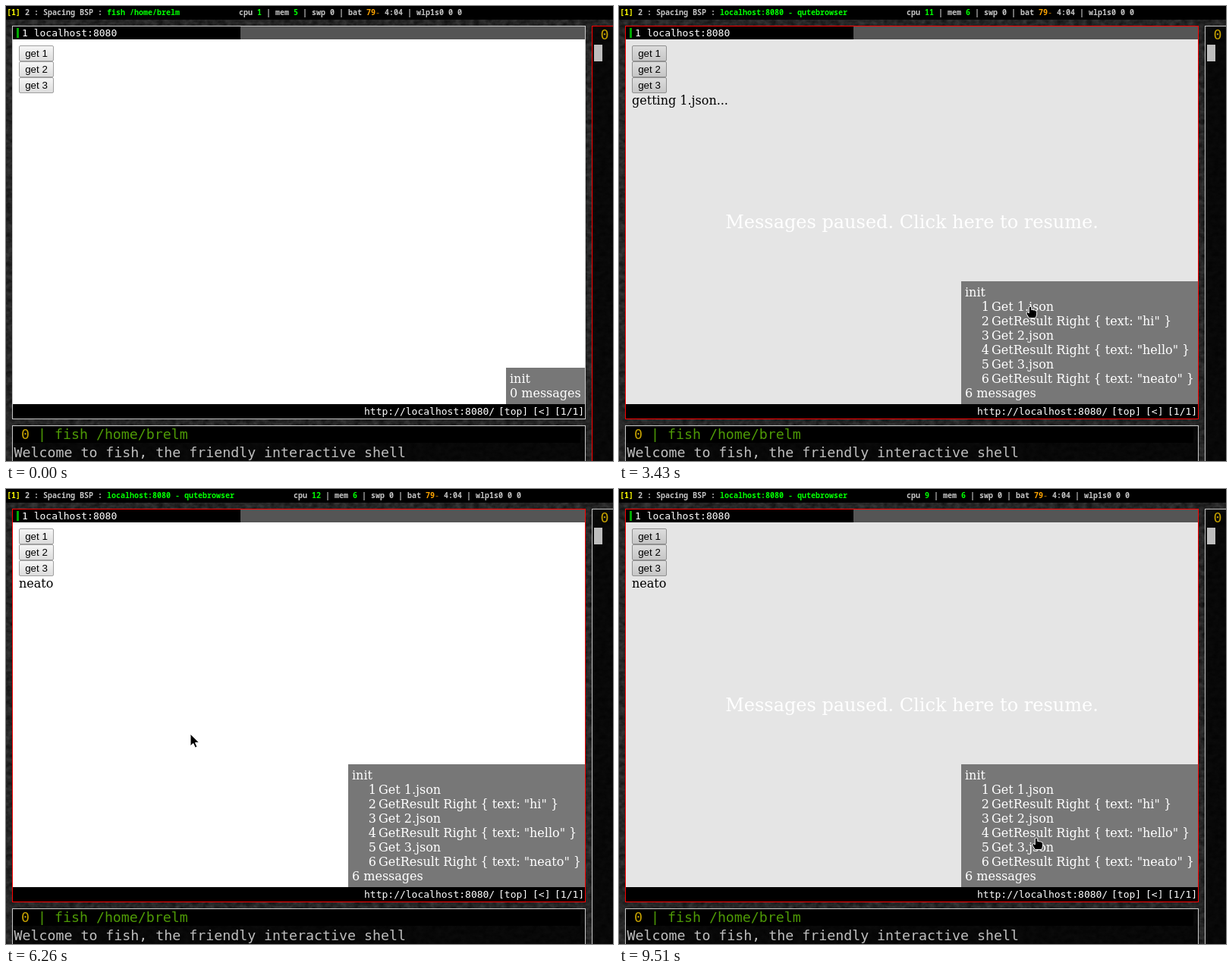
These frames come from a looping animation (800x600 px, 9560 ms). An HTML page:

```html
<!DOCTYPE html>
<html lang="en">
<head>
<meta charset="utf-8">
<title>Message log demo</title>
<style>
html, body { margin: 0; width: 100%; height: 100%; overflow: hidden; background: #000; }
svg { display: block; }
text { white-space: pre; }
.bar { font: bold 10px "Noto Sans Mono", monospace; fill: #c4c4c4; }
.mono { font: 13px "DejaVu Sans Mono", monospace; fill: #fff; }
.term { font: 18.25px "DejaVu Sans Mono", monospace; fill: #bebebe; }
.serif { font: 16px "DejaVu Serif", serif; }
.button { font: 13.333px "Liberation Sans", sans-serif; text-anchor: middle; }
.paused { font: 24px "DejaVu Serif", serif; fill: #fff; text-anchor: middle; }
.good { fill: #0f0; }
.warn { fill: #ffa500; }
.dim { fill: #8a5a00; }
.gold { fill: #c4a000; }
.leaf { fill: #4e9a06; }
</style>
</head>
<body>
<svg id="stage" width="800" height="600" viewBox="0 0 800 600">
  <defs>
    <filter id="grain" x="0" y="0" width="100%" height="100%" color-interpolation-filters="sRGB">
      <feTurbulence type="fractalNoise" baseFrequency=".12 .16" numOctaves="3" seed="4"/>
      <feColorMatrix values=".2 0 0 0 .05  .2 0 0 0 .05  .2 0 0 0 .05  0 0 0 0 1"/>
    </filter>
    <linearGradient id="face" x2="0" y2="1">
      <stop offset="0" stop-color="#f6f6f6"/>
      <stop offset="1" stop-color="#dcdcdc"/>
    </linearGradient>
  </defs>

  <rect width="800" height="600" filter="url(#grain)"/>
  <rect width="800" height="18"/>
  <text id="bar" class="bar" x="1" y="12"></text>

  <rect id="sideWindow" x="772.5" y="26.5" width="60" height="600" fill="#000" fill-opacity=".8"/>
  <text class="term gold" x="783.5" y="44">0</text>
  <rect x="775" y="51" width="11" height="22" fill="#bebebe"/>

  <rect x="8.5" y="553.5" width="755" height="60" fill="#000" fill-opacity=".8" stroke="#c8c8c8"/>
  <rect x="10" y="555" width="747" height="21"/>
  <text class="term gold" x="20" y="571">0 <tspan class="leaf">| fish /home/brelm</tspan></text>
  <text class="term" x="10.5" y="595">Welcome to fish, the friendly interactive shell</text>

  <rect x="9" y="27" width="300" height="17"/>
  <rect x="309" y="27" width="454" height="17" fill="#555"/>
  <rect x="14" y="29" width="3" height="13" fill="#0a0"/>
  <text class="mono" x="21" y="40">1 localhost:8080</text>
  <rect x="9" y="44" width="754" height="481" fill="#fff"/>
  <g id="buttons"></g>
  <text id="output" class="serif" x="17" y="130"></text>
  <g id="overlay">
    <rect x="9" y="44" width="754" height="481" fill-opacity=".1"/>
    <text class="paused" x="386" y="293">Messages paused. Click here to resume.</text>
  </g>
  <g id="panel" class="serif" fill="#fff"></g>
  <rect x="9" y="525" width="754" height="19"/>
  <text class="mono" x="472" y="539">http://localhost:8080/</text>
  <text class="mono" x="649" y="539">[top]</text>
  <text class="mono" x="694" y="539">[&lt;]</text>
  <text class="mono" x="723" y="539">[1/1]</text>
  <rect id="browser" x="8.5" y="26.5" width="755" height="518" fill="none"/>

  <g id="pointer" stroke="#fff" stroke-linejoin="round">
    <path id="arrow" d="M0 0V16L3.8 12.6 6.4 18.2 9 17 6.5 11.6 11.4 11.2Z"/>
    <path id="hand" d="M-1.8 1Q0 -1 1.8 1V4.6Q3.2 3.8 4.3 5Q5.8 4.5 6.6 5.6Q8.6 5.4 8.6 7.6V11Q8 13 7 15.5H-1.6L-4.8 10.4Q-5.8 7.6 -3.6 7.6L-1.8 9Z"/>
  </g>
</svg>
<script>
const LOOP = 9560;
const $ = id => document.getElementById(id);
const replies = ["hi", "hello", "neato"];
const getting = n => `getting ${n}.json...`;

// Each entry: [time, value], held until the next one.
const loads = [
  ["0"], ["cpu", 0, 1, 5, "0 0"], ["cpu", 1260, 16, 6, "0 0"], ["cpu", 2250, 15, 6, "0 0"],
  ["cpu", 3240, 11, 6, "0 0"], ["cpu", 5260, 14, 6, "0 0"], ["cpu", 6260, 12, 6, "0 0"],
  ["cpu", 7260, 3, 5, "6 0"], ["cpu", 8230, 12, 6, "0 0"], ["cpu", 9260, 9, 6, "0 0"]
].slice(1).map(([, time, ...load]) => [time, load]);

const outputs = [
  [0, ""],
  [1180, getting(1)], [1390, "hi"],
  [1880, getting(2)], [2000, "hello"],
  [2330, getting(3)], [2470, "neato"],
  [3430, getting(1)], [3970, "hi"],
  [4510, getting(2)], [5070, "hello"],
  [5590, getting(3)], [6040, "neato"]
];
const counts = [[0, 0], [1180, 1], [1390, 2], [1880, 3], [2000, 4], [2330, 5], [2470, 6]];
const pauses = [[0, false], [3430, true], [6040, false], [8880, true]];

// Pointer moves: start, end, x, y of the tip.
const moves = [
  [640, 1100, 47, 53],
  [1640, 1760, 46, 75],
  [2060, 2180, 45, 97],
  [2620, 2800, 462, 369],
  [2960, 3280, 542, 396],
  [3640, 3800, 543, 413],
  [4140, 4370, 543, 429],
  [4660, 4820, 539, 451],
  [5220, 5450, 541, 479],
  [5760, 5920, 243, 323],
  [7260, 7780, 659, 459],
  [7990, 8110, 664, 493],
  [8150, 8230, 662, 503],
  [8440, 8740, 552, 485],
  [9150, 9510, 550, 460]
];

const at = (track, t) => track.reduce((held, [time, value]) => time <= t ? value : held, null);
const ease = p => p * p * (3 - 2 * p);

function pointerAt(t) {
  let x = -14, y = -22;
  for (const [start, end, toX, toY] of moves) {
    if (t < start) break;
    const steps = Math.round((end - start) / 40);
    const done = Math.floor((t - start) / (end - start) * steps + 1e-6) + 1;
    const p = ease(Math.min(1, done / (steps + 1)));
    x += (toX - x) * p;
    y += (toY - y) * p;
  }
  return [Math.round(x), Math.round(y)];
}

function barMarkup(title, [cpu, mem, net]) {
  const good = s => `<tspan class="good">${s}</tspan>`;
  return `<tspan fill="#ff0">[1]</tspan> 2 : Spacing BSP : ${good(title)}${" ".repeat(13)}` +
    `cpu ${good(cpu)} | mem ${good(mem)} | swp 0 | bat <tspan class="warn">79</tspan>` +
    `<tspan class="dim">-</tspan> 4:04 | wlp1s0 ${net}`;
}

const message = i => i % 2
  ? `GetResult Right { text: "${replies[(i - 1) / 2]}" }`
  : `Get ${i / 2 + 1}.json`;

const pen = document.createElement("canvas").getContext("2d");
pen.font = '16px "DejaVu Serif", serif';
const widthOf = s => pen.measureText(s).width;

function panelLayout(count) {
  const items = Array.from({ length: count }, (_, i) => message(i));
  const total = `${count} messages`;
  const inner = Math.max(widthOf(total), ...items.map(s => widthOf(s) + 35));
  const left = Math.round(763 - inner - 10);
  const top = 525 - 10 - 19 * (count + 2);
  const line = (s, dx, row, extra = "") =>
    `<text x="${left + dx}" y="${top + 20 + row * 19}" ${extra}>${s}</text>`;
  const markup =
    `<rect x="${left}" y="${top}" width="${763 - left}" height="${525 - top}" fill="#777"/>` +
    line("init", 5, 0) +
    items.map((s, i) => line(i + 1, 37, i + 1, 'text-anchor="end"') + line(s, 40, i + 1)).join("") +
    line(total, 5, count + 1);
  return { left, top, markup };
}
const panels = counts.map(([, n]) => panelLayout(n));

$("buttons").innerHTML = [1, 2, 3].map(n => {
  const y = 31 + 21 * n;
  return `<rect x="17.5" y="${y + .5}" width="45" height="20" rx="1.5" fill="url(#face)"/>` +
    `<text class="button" x="40" y="${y + 15}">get ${n}</text>`;
}).join("");
const faces = [...document.querySelectorAll("#buttons rect")];

const shown = {};
function setMarkup(id, markup) {
  if (shown[id] === markup) return;
  shown[id] = markup;
  $(id).innerHTML = markup;
}

function draw(t) {
  const focused = t >= 310;
  const title = t >= 360 ? "localhost:8080 - qutebrowser" : "fish /home/brelm";
  const paused = at(pauses, t);
  const panel = panels[at(counts, t)];
  const [x, y] = pointerAt(t);
  const overPanel = x >= panel.left && y >= panel.top;

  setMarkup("bar", barMarkup(title, at(loads, t)));
  setMarkup("panel", panel.markup);
  setMarkup("output", at(outputs, t));
  $("browser").setAttribute("stroke", focused ? "#f00" : "#c8c8c8");
  $("sideWindow").setAttribute("stroke", focused ? "#c8c8c8" : "#f00");
  $("overlay").style.display = paused ? "" : "none";
  faces.forEach((face, i) => {
    const top = 52 + 21 * i;
    const hover = x >= 17 && x < 63 && y >= top && y < top + 21;
    face.setAttribute("stroke", hover ? "#777" : "#a0a0a0");
  });
  $("pointer").setAttribute("transform", `translate(${x} ${y})`);
  $("pointer").style.display = t < 640 ? "none" : "";
  $("arrow").style.display = overPanel ? "none" : "";
  $("hand").style.display = overPanel ? "" : "none";
}

const began = performance.now();
function tick() {
  draw((performance.now() - began) % LOOP);
  requestAnimationFrame(tick);
}
tick();
</script>
</body>
</html>
```
